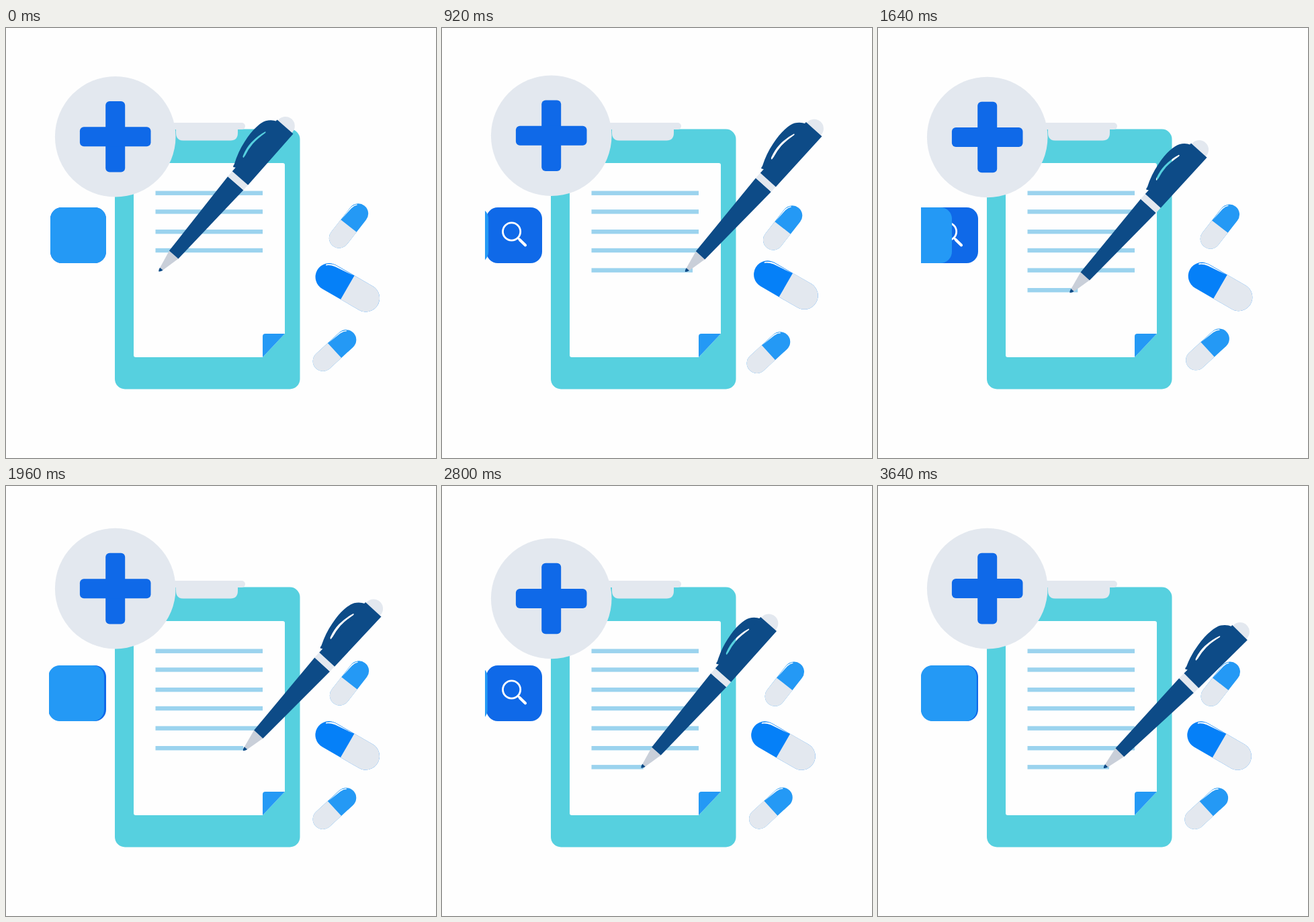
An HTML page that plays this animation: 640x640 px, repeating every 3680 ms.

```html
<!DOCTYPE html>
<html lang="en">
<head>
<meta charset="utf-8">
<title>Medical notes</title>
<style>
  html, body { margin: 0; width: 100%; height: 100%; overflow: hidden; background: #fefefe; }
  svg { display: block; width: 100vw; height: 100vh; }
</style>
</head>
<body>
<svg viewBox="0 0 640 640">
  <defs>
    <clipPath id="slot"><rect x="64" y="260" width="100" height="100"/></clipPath>
    <clipPath id="tileClip"><rect x="66" y="267" width="83" height="83" rx="17"/></clipPath>
  </defs>
  <rect width="640" height="640" fill="#fefefe"/>

  <!-- clipboard -->
  <rect x="162" y="150.5" width="275.5" height="387" rx="15" fill="#56d0df"/>
  <path d="M193 201H412Q415 201 415 204V455L382 490H193Q190 490 190 487V204Q190 201 193 201Z" fill="#fefefe"/>
  <path d="M415 455H386Q382 455 382 459V490Z" fill="#2499f5"/>
  <path d="M242 141H351A5 5 0 0 1 351 151H345V156Q345 167.5 334 167.5H264Q253 167.5 253 156V151H242Z" fill="#e3e8ef"/>
  <g id="lines" fill="#9bd3ee"></g>

  <!-- badge -->
  <g id="badge">
    <circle r="89.8" fill="#e3e8ef"/>
    <g fill="#0f69e8">
      <rect x="-14.5" y="-52.8" width="29" height="105.6" rx="6"/>
      <rect x="-52.8" y="-14.5" width="105.6" height="29" rx="6"/>
    </g>
  </g>

  <!-- search tile -->
  <rect x="66" y="267" width="83" height="83" rx="17" fill="#0f69e8"/>
  <g clip-path="url(#tileClip)">
    <g id="lens" fill="none" stroke="#fff" stroke-linecap="round">
      <circle cx="103.6" cy="303" r="13.1" stroke-width="2.8"/>
      <path d="M113 312.5L117 316" stroke-width="3"/>
      <path d="M116 315.5L124 323.3" stroke-width="4.2"/>
    </g>
  </g>
  <g clip-path="url(#slot)">
    <rect id="cover" x="66" y="267" width="83" height="83" rx="17" fill="#2499f5"/>
  </g>

  <g id="pills"></g>

  <!-- pen, tip at the local origin, pointing down -->
  <g id="pen">
    <circle cy="-287" r="14" fill="#e3e8ef"/>
    <path d="M-8.7 -33.6L-2.2 -4L0 0L2.8 -4L9.3 -33.6Z" fill="#c9cfd9"/>
    <path d="M-2.6 -5.5Q-2 -1 0 0Q2.4 -2 3.2 -5.5Z" fill="#0d4b87"/>
    <path d="M-8.7 -33.4L-15.4 -174.2H15.4L9.3 -33.4Z" fill="#0d4b87"/>
    <rect x="-15.5" y="-184.5" width="31" height="10.5" fill="#e3e8ef"/>
    <path d="M-15.4 -184.3V-286H16.4L15.6 -184.3Z" fill="#0d4b87"/>
    <path fill="#0d4b87" fill-rule="evenodd" d="M-14 -192.4L-18.6 -190Q-20 -191 -20 -194Q-28 -212 -30.3 -229Q-33 -245 -31.6 -256.7Q-30.5 -268 -27 -273.5Q-22 -281 -14 -284Z
      M-16 -210.5Q-18.2 -210 -19 -213.5Q-22.5 -224 -22.3 -235Q-21.5 -250 -17.2 -261Q-16 -262 -15.6 -260Q-19 -246 -19.2 -235Q-19 -225 -16.4 -215Z"/>
  </g>
</svg>
<script>
const LOOP = 3680, STEP = 40;
const $ = id => document.getElementById(id);
const NS = 'http://www.w3.org/2000/svg';

function add(parent, tag, attrs) {
  const el = document.createElementNS(NS, tag);
  for (const k in attrs) el.setAttribute(k, attrs[k]);
  parent.appendChild(el);
  return el;
}

const linear = u => u;
const smooth = u => u * u * (3 - 2 * u);
const easeOut = u => 1 - (1 - u) * (1 - u);

// ease with control points (.33, 0) and (.5, 1)
function glide(x) {
  let lo = 0, hi = 1;
  for (let i = 0; i < 24; i++) {
    const s = (lo + hi) / 2, r = 1 - s;
    if (3 * s * r * r * .33 + 3 * s * s * r * .5 + s * s * s < x) lo = s; else hi = s;
  }
  return smooth(lo);
}

// keys: [time, value, ease used to reach it]
function track(t, keys) {
  for (let i = 1; i < keys.length; i++) {
    const [t0, v0] = keys[i - 1], [t1, v1, ease = smooth] = keys[i];
    if (t < t1) return v0 + (v1 - v0) * ease(Math.max(0, (t - t0) / (t1 - t0)));
  }
  return keys[keys.length - 1][1];
}

const badgeY = [[0, 161.8], [640, 152.6], [1300, 172.4], [1980, 152.6], [2640, 169], [3500, 152.6]];
const coverX = [[0, 0], [1130, -84, glide], [1420, -84], [1840, 0]];
const lensY = [[1020, 0], [1240, 19.5], [1460, 0]];
const penX = [[0, 227.5], [975, 370, linear], [1225, 225.5], [2160, 370], [2320, 224], [3500, 336, easeOut]];
const penY = [[0, 362.5], [975, 363], [1225, 397], [1640, 394], [2160, 394], [2320, 419.5], [3500, 420]];
const penTilt = [[0, 0], [520, .5], [975, 1], [1240, 3.5], [1640, 1.1], [2280, 2], [2800, .4], [3640, 4]];

const written = [
  [360.6, [[0, 0], [975, 159.5, linear]]],
  [390.2, [[1211, 0], [2126, 159.5, linear]]],
  [418.3, [[2340, 0], [3500, 121.5, easeOut]]]
];

const addLine = (y, width) =>
  add($('lines'), 'rect', { x: 222.5, y: y - 3.2, width, height: 6.4 });
for (const y of [245.7, 273.4, 303.2, 331]) addLine(y, 159.5);
const lines = written.map(([y, keys]) => ({ keys, el: addLine(y, 0) }));

// sway: damped swing along a diagonal
const pills = [
  { x: 510, y: 294.5, turn: 38, r: 15, len: 46, fill: '#2499f5', side: 1, amp: -8.4, period: .69, decay: 1 },
  { x: 508.3, y: 386.2, turn: -60, r: 20.5, len: 63, fill: '#0580f8', side: -1, amp: 9.5, period: .78, decay: .95 },
  { x: 489, y: 480, turn: 47.5, r: 15, len: 47, fill: '#2499f5', side: 1, amp: 8, period: 1.3, decay: 1 }
];

for (const p of pills) {
  const { r, len } = p, h = len / 2;
  p.el = add($('pills'), 'g', {});
  const g = add(p.el, 'g', { transform: `rotate(${p.turn})` });
  add(g, 'rect', { x: -r, y: -h - r, width: 2 * r, height: len + 2 * r, rx: r, fill: p.fill });
  add(g, 'path', { d: `M${-r} 0V${h}A${r} ${r} 0 0 0 ${r} ${h}V0Z`, fill: '#e3e8ef' });
  add(g, 'path', {
    d: `M${-.97 * r} -1L${-.86 * r} ${-h}Q${-.8 * r} ${-h - .4 * r} ${-.6 * r} ${-h - .62 * r}` +
       `Q${-.68 * r} ${-h - .72 * r} ${-.8 * r} ${-h - .48 * r}Q${-.96 * r} ${-h - .25 * r} ${-.97 * r} ${-h}Z`,
    fill: '#fff', transform: `scale(${p.side} 1)`
  });
}

function draw(t) {
  const half = t % (LOOP / 2), sec = t / 1000;
  $('badge').setAttribute('transform', `translate(162.7 ${track(t, badgeY)})`);
  $('cover').setAttribute('x', 66 + track(half, coverX));
  $('lens').setAttribute('transform', `translate(0 ${track(half, lensY)})`);
  for (const { el, keys } of lines) el.setAttribute('width', track(t, keys));
  for (const p of pills) {
    const d = p.amp * Math.sin(2 * Math.PI * sec / p.period) * Math.exp(-p.decay * sec);
    p.el.setAttribute('transform', `translate(${p.x + d} ${p.y - d})`);
  }
  $('pen').setAttribute('transform',
    `translate(${track(t, penX)} ${track(t, penY)}) rotate(${41 + track(t, penTilt)})`);
}

let start;
function tick(now) {
  if (start === undefined) start = now;
  draw(Math.floor(((now - start) % LOOP) / STEP) * STEP);
  requestAnimationFrame(tick);
}
draw(0);
requestAnimationFrame(tick);
</script>
</body>
</html>
```
